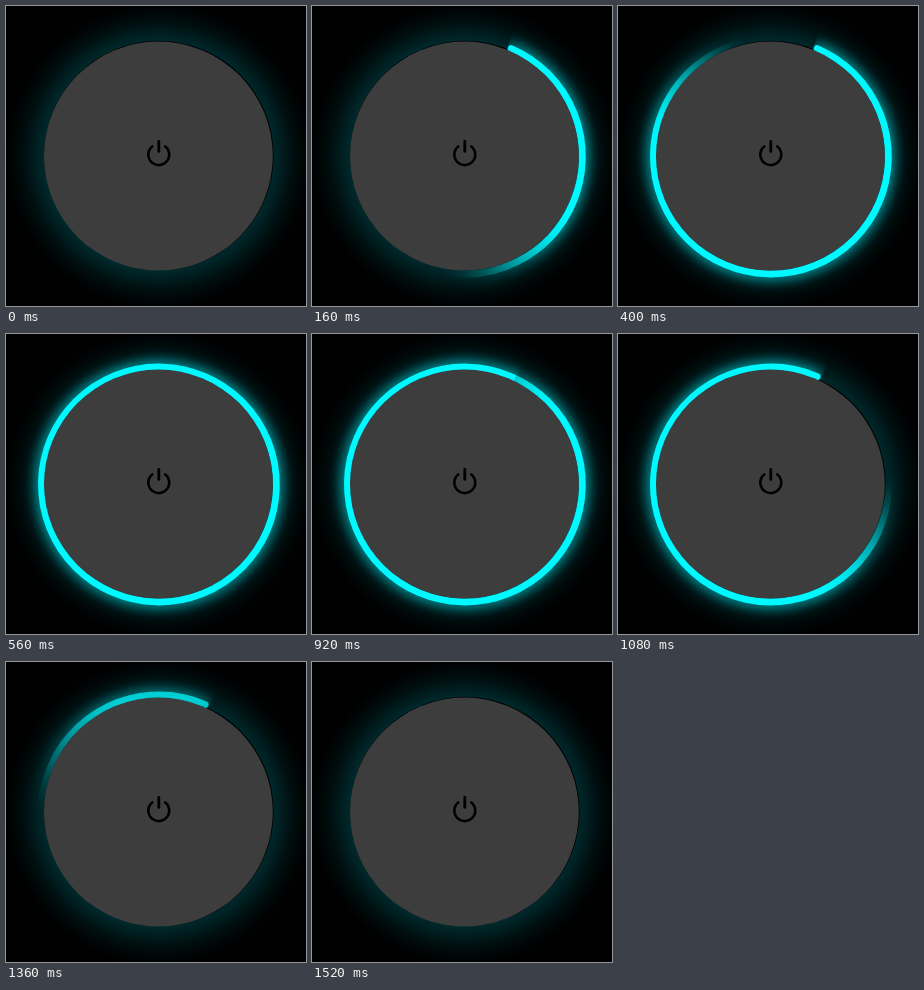
Recreate the animation shown at these times as an HTML page with a canvas. Size 300 px wide and 300 px high, loop 1.8 s.

```html
<!DOCTYPE html>
<html lang="en">
<head>
<meta charset="utf-8">
<title>Power ring</title>
<style>
  html, body { margin: 0; height: 100%; overflow: hidden; background: #000; }
  canvas { display: block; }
</style>
</head>
<body>
<canvas id="stage" width="300" height="300"></canvas>
<script>
const ctx = document.getElementById('stage').getContext('2d');
const LOOP = 1800, STEP = 40;
const RAD = Math.PI / 180;
const START = 23.2 - 90;   // ring start, degrees clockwise from the x axis
const FEATHER = 75;        // length of the soft end, degrees
const SPEED = 0.6625;      // degrees per ms
const CX = 152.9, CY = 150.5;

const clamp = v => Math.min(1, Math.max(0, v));
const smooth = v => v * v * (3 - 2 * v);

function disc(x, y, r, fill) {
  ctx.fillStyle = fill;
  ctx.beginPath();
  ctx.arc(x, y, r, 0, 2 * Math.PI);
  ctx.fill();
}

function backGlow() {
  const g = ctx.createRadialGradient(152.5, 150, 112, 152.5, 150, 156);
  [[0, 44], [0.25, 30], [0.5, 15], [0.75, 5], [1, 0]].forEach(([at, v]) =>
    g.addColorStop(at, `rgb(0,${v},${Math.round(v * 1.05)})`));
  ctx.fillStyle = g;
  ctx.fillRect(0, 0, 300, 300);
}

function ring(t) {
  if (t <= 0 || t >= 1520) return;
  const erasing = t > 560;
  const edge = erasing ? SPEED * (t - 880) - FEATHER : 64 + SPEED * t;
  const alphaAt = a => smooth(clamp((erasing ? a - edge : edge - a) / FEATHER));

  // The seam is shifted so the round cap takes the visible side's colour.
  const seam = START + (erasing ? 2 : -2);
  const paint = ctx.createConicGradient(seam * RAD, CX, CY);
  for (let i = 0; i <= 72; i++)
    paint.addColorStop(i / 72, `rgba(0,248,255,${alphaAt(i * 5)})`);

  ctx.save();
  ctx.globalAlpha = Math.min(clamp(t / 115), clamp((1520 - t) / 220));
  ctx.strokeStyle = paint;
  ctx.lineWidth = 6.8;
  ctx.lineCap = 'round';
  ctx.shadowColor = '#00f8ff';
  ctx.shadowBlur = 14;
  const from = erasing ? Math.max(0, edge) : 0;
  const to = erasing ? 360 : Math.min(360, edge);
  ctx.beginPath();
  ctx.arc(CX, CY, 117.5, (START + from) * RAD, (START + to) * RAD);
  ctx.stroke();
  ctx.restore();
}

function powerIcon() {
  ctx.strokeStyle = '#000';
  ctx.lineWidth = 2.5;
  ctx.lineCap = 'butt';
  ctx.beginPath();
  ctx.arc(152.8, 148.6, 10.5, -58 * RAD, 238 * RAD);
  ctx.stroke();
  ctx.lineWidth = 2.8;
  ctx.lineCap = 'round';
  ctx.beginPath();
  ctx.moveTo(152.8, 135.4);
  ctx.lineTo(152.8, 145.4);
  ctx.stroke();
}

function draw() {
  const t = Math.floor(performance.now() % LOOP / STEP) * STEP;
  ctx.fillStyle = '#000';
  ctx.fillRect(0, 0, 300, 300);
  backGlow();
  disc(152.9, 149.5, 114.8, '#000');
  ring(t);
  disc(152.4, 150, 114.4, '#3d3d3d');
  powerIcon();
  requestAnimationFrame(draw);
}
draw();
</script>
</body>
</html>
```
